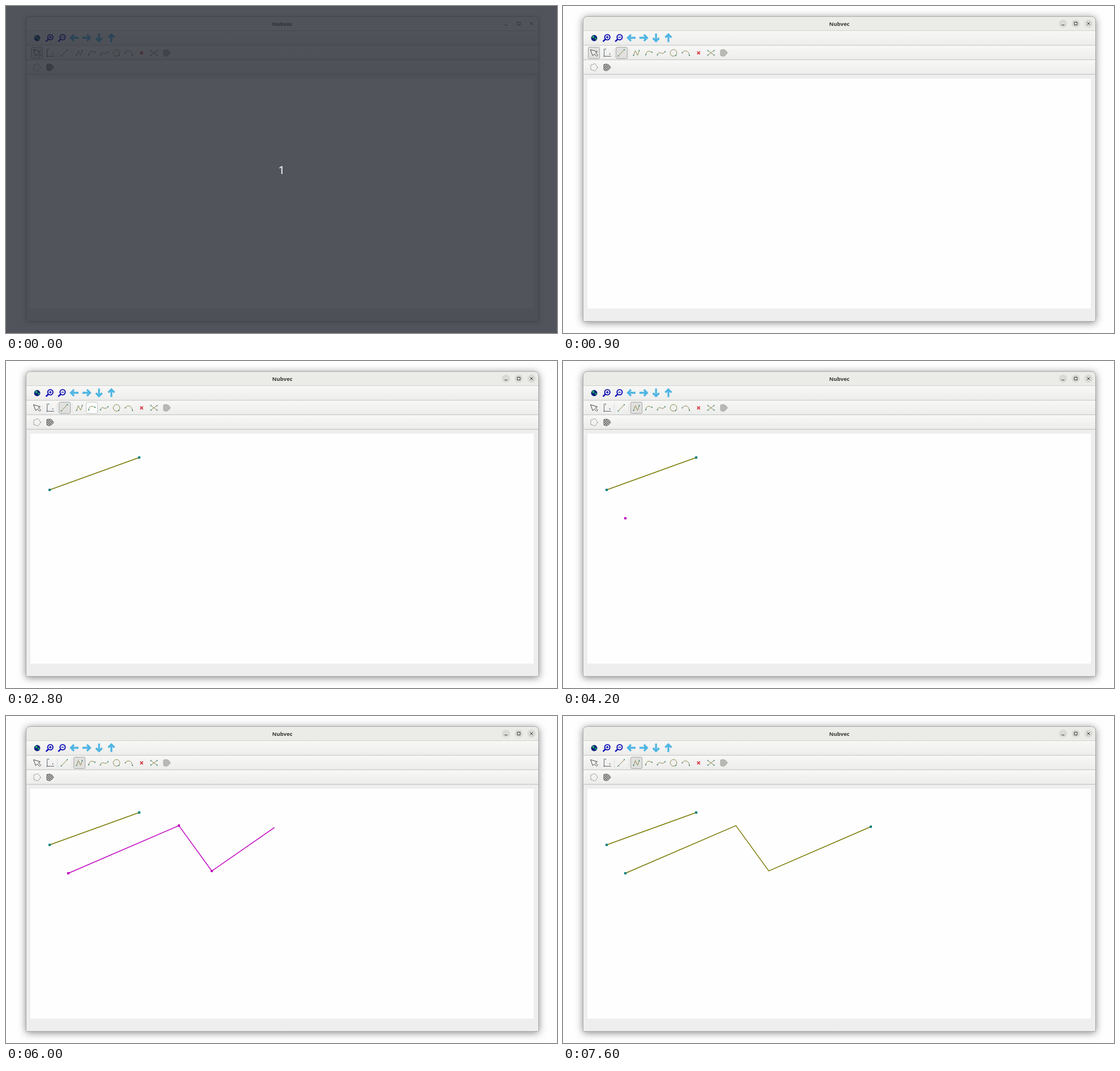
Recreate the animation shown at these times as an HTML page with a canvas. Size 972 px wide and 576 px high, loop 8 s.

```html
<!DOCTYPE html>
<html lang="en">
<head>
<meta charset="utf-8">
<title>Drawing tool</title>
<style>
html, body { margin: 0; width: 972px; height: 576px; overflow: hidden; background: #fefefe; }
canvas { display: block; }
</style>
</head>
<body>
<canvas id="stage" width="972" height="576"></canvas>
<script>
const c = document.getElementById('stage').getContext('2d');
const LOOP = 8000, STEP = 100;
const OLIVE = '#787800', TEAL = '#008080', MAGENTA = '#c000c0', NAVY = '#0808b4', THIN = '#8c8c4c';

function fillRect(x, y, w, h, color) {
  c.fillStyle = color;
  c.fillRect(x, y, w, h);
}

function stroke(shape, color, width = 1) {
  c.strokeStyle = color;
  c.lineWidth = width;
  c.stroke(typeof shape === 'string' ? new Path2D(shape) : shape);
}

function line(points, color, width) {
  const p = new Path2D();
  points.forEach(([x, y]) => p.lineTo(x, y));
  stroke(p, color, width);
}

function circle(r, x = 0, y = 0) {
  const p = new Path2D();
  p.arc(x, y, r, 0, 7);
  return p;
}

// Closed outline of n corners, its radius uneven by the given amount.
function blob(n, r, uneven = 0) {
  const p = new Path2D();
  for (let i = 0; i < n; i++) {
    const a = i / n * 2 * Math.PI, d = r + uneven * Math.cos(i * 2.4);
    p.lineTo(d * Math.cos(a), d * Math.sin(a));
  }
  p.closePath();
  return p;
}

function fill(shape, color) {
  c.fillStyle = color;
  c.fill(shape);
}

function dots(points, color, size) {
  points.forEach(([x, y]) => fillRect(x - size / 2, y - size / 2, size, size, color));
}

function at(x, y, draw, angle = 0) {
  c.save();
  c.translate(x, y);
  c.rotate(angle);
  draw();
  c.restore();
}

function text(s, x, y, font, color) {
  c.font = font + ' "Noto Sans", "Open Sans", sans-serif';
  c.textAlign = 'center';
  c.fillStyle = color;
  c.fillText(s, x, y);
}

function button(x, y, pressed) {
  const box = new Path2D();
  box.roundRect(x - 10, y - 10, 20, 20, 2);
  fill(box, pressed ? '#e0e0df' : '#fcfcfc');
  stroke(box, pressed ? '#a6a6a5' : '#c6c6c5');
}

function windowFrame(focused) {
  const outline = new Path2D();
  outline.roundRect(35.5, 18.5, 904, 537, [7, 7, 1, 1]);
  c.save();
  c.shadowColor = focused ? 'rgba(0,0,0,.5)' : 'rgba(0,0,0,.24)';
  c.shadowBlur = focused ? 14 : 10;
  c.shadowOffsetY = 2;
  fill(outline, '#eeeeee');
  c.restore();

  c.save();
  c.clip(outline);
  fillRect(35, 18, 906, 25, focused ? '#ebebe8' : '#fafaf9');
  const rowY = i => 43 + 25.6 * i;
  for (let i = 0; i < 3; i++) {
    const g = c.createLinearGradient(0, rowY(i), 0, rowY(i + 1));
    g.addColorStop(0, '#f8f8f7');
    g.addColorStop(1, '#ededec');
    fillRect(35, rowY(i), 906, 26, g);
  }
  for (let i = 0; i < 4; i++) fillRect(35, rowY(i), 906, 1, i ? '#bebebd' : '#d2d2d0');
  fillRect(43, 128, 888, 405, '#fefefe');
  c.restore();
  stroke(outline, focused ? '#a9a9a8' : '#bcbcbb');

  const ink = focused ? '#363636' : '#5c5c5c';
  text('Nubvec', 487.5, 35, 'bold 9.6px', ink);
  ['M-2.5 2.5h5', 'M-2.5-2.5h5v5h-5z', 'M-2.5-2.5l5 5m0-5l-5 5'].forEach((glyph, i) =>
    at(882 + 22.5 * i, 31, () => {
      if (focused) fill(circle(7.2), '#d9d9d6');
      stroke(glyph, ink);
    }));
}

function globe() {
  fill(circle(5.4), '#0a1c80');
  fill(circle(2.1, -1.5, -1.8), '#20b060');
  fill(circle(1.8, 2.7, 1.2), '#18a058');
}

function magnifier(sign) {
  stroke(circle(4.6, 1.2, -1), NAVY, 1.9);
  stroke('M-2.2 2.4l-4.3 4.2', NAVY, 2.5);
  stroke('M-1-1h4.400' + sign, NAVY, 1.3);
}

const arrow = () => stroke('M-7.5 0H6M.5-5.5L6 0L.5 5.5', '#4fb5e3', 3.3);

// A thin curve with small marks where it starts and ends.
function sketch(d, ...ends) {
  stroke(d, THIN);
  dots(ends, '#2d8072', 1.8);
}

function patch(color, edge, mesh) {
  const shape = blob(8, 6.3, 1);
  fill(shape, color);
  stroke(shape, edge, .8);
  if (!mesh) return;
  c.clip(shape);
  for (let i = -12; i <= 12; i += 4) stroke(`M${i - 7}-7l14 14M${i + 7}-7l-14 14`, '#626262', .7);
}

const tools = [
  () => sketch('M-4.5 4.5L-1.5-4L2.500 4.5L5.5-4', [-4.5, 4.5], [5.5, -4]),
  () => sketch('M-5 3.500Q-3.500-6.500 6-1', [-5, 3.5], [6, -1]),
  () => sketch('M-6.5 3.500C-3-6 1 6 7-2', [-6.5, 3.5], [7, -2]),
  () => { stroke(circle(5.8), THIN); dots([[4, 4.5]], '#2d8072', 1.8); },
  () => sketch('M-6.5 0C-3-6 5-4 6 4.500', [-6.5, 0], [6, 4.5]),
  () => stroke('M-2.300-2.300l5 5m0-5l-5 5', '#d83c40', 1.8),
  () => sketch('M-5.500-4L5.500 4M-5.500 4L5.500-4', [-5.5, -4], [5.5, -4], [-5.5, 4], [5.5, 4]),
  () => patch('#b8b8b4', '#a4a4a0')
];

function icons() {
  at(55, 56.5, globe);
  at(77, 56, () => magnifier('m-2.2-2.2v4.4'));
  at(98.7, 56, () => magnifier(''));
  [2, 0, 1, 3].forEach((turn, i) => at(120.5 + 21.8 * i, 56, arrow, turn * Math.PI / 2));

  const cursor = new Path2D('M48.500 77l12 3.500l-3.500 2l4.500 4l-2 2l-4.500-4l-2.500 3z');
  fill(cursor, '#f5f5f5');
  stroke(cursor, '#444');
  stroke('M72.500 75v13.500h12.500', '#666');
  dots([[72.5, 88.5], [75, 76], [82.5, 84.5]], '#3a7088', 1.7);
  [90, 116].forEach(x => fillRect(x, 74, 1, 17, '#dfdfde'));
  at(103, 82.5, () => sketch('M-5.5 5.5L5-5.5', [-5.5, 5.5], [5, -5.5]));
  tools.forEach((tool, i) => at(129 + 22 * i, 82.5, tool));

  at(54.5, 108, () => {
    c.setLineDash([2, 1.2]);
    stroke(blob(5, 6.8), '#747474');
  });
  at(77, 108, () => patch('#b4b4b2', '#666', true));
}

// Which tool buttons are raised or sunk at time t.
function buttons(t) {
  if (t >= 100 && t < 200) button(54.5, 56.5, false);
  if (t < 1000) button(54.5, 82.5, true);
  if (t >= 700 && t < 3400) button(103.5, 82.5, t >= 900);
  if (t >= 2800 && t < 3100) button(151.5, 82.5, false);
  if (t >= 3100) button(129.5, 82.5, t >= 3300);
}

// Each stop: place, when the pointer arrives, when it clicks, and how its way there bows.
const shapes = [
  {
    done: 2400,
    stops: [
      { p: [77, 227], click: 1700 },
      { p: [235, 170], arrive: 2400, click: 2400, bow: [0, -11] }
    ]
  },
  {
    done: 7600,
    stops: [
      { p: [110, 277], click: 4200 },
      { p: [305, 193], arrive: 4900, click: 5100, bow: [68, -19] },
      { p: [363, 273], arrive: 5500, click: 5500, bow: [0, 0] },
      { p: [543, 195], arrive: 6600, click: 7000, bow: [-16, -22] },
      { p: [608, 188], arrive: 7400, click: Infinity, bow: [0, 10] }
    ]
  }
];

function pointer(from, to, t) {
  const f = Math.min(1, (t - from.click) / (to.arrive - from.click));
  const ease = 1 - (1 - f) ** 2, bend = Math.sin(Math.PI * f);
  return from.p.map((v, i) => v + (to.p[i] - v) * ease + to.bow[i] * bend);
}

function drawShape({ stops, done }, t) {
  const n = stops.filter(s => s.click <= t).length;
  if (!n) return;
  const points = stops.slice(0, n).map(s => s.p);
  if (t >= done) {
    line(points, OLIVE, 1.4);
    dots([points[0], points[n - 1]], TEAL, 4);
  } else {
    line([...points, pointer(stops[n - 1], stops[n], t)], MAGENTA, 1.4);
    dots(points, MAGENTA, 4);
  }
}

function draw(now) {
  const t = Math.floor(now % LOOP / STEP) * STEP;
  fillRect(0, 0, 972, 576, '#fefefe');
  windowFrame(t >= 900);
  buttons(t);
  icons();
  shapes.forEach(s => drawShape(s, t));
  if (t < 100) {
    fillRect(0, 0, 972, 576, 'rgba(33,37,45,.78)');
    text('1', 486, 295.5, '20.500px', '#fff');
  }
  requestAnimationFrame(draw);
}
requestAnimationFrame(draw);
</script>
</body>
</html>
```
